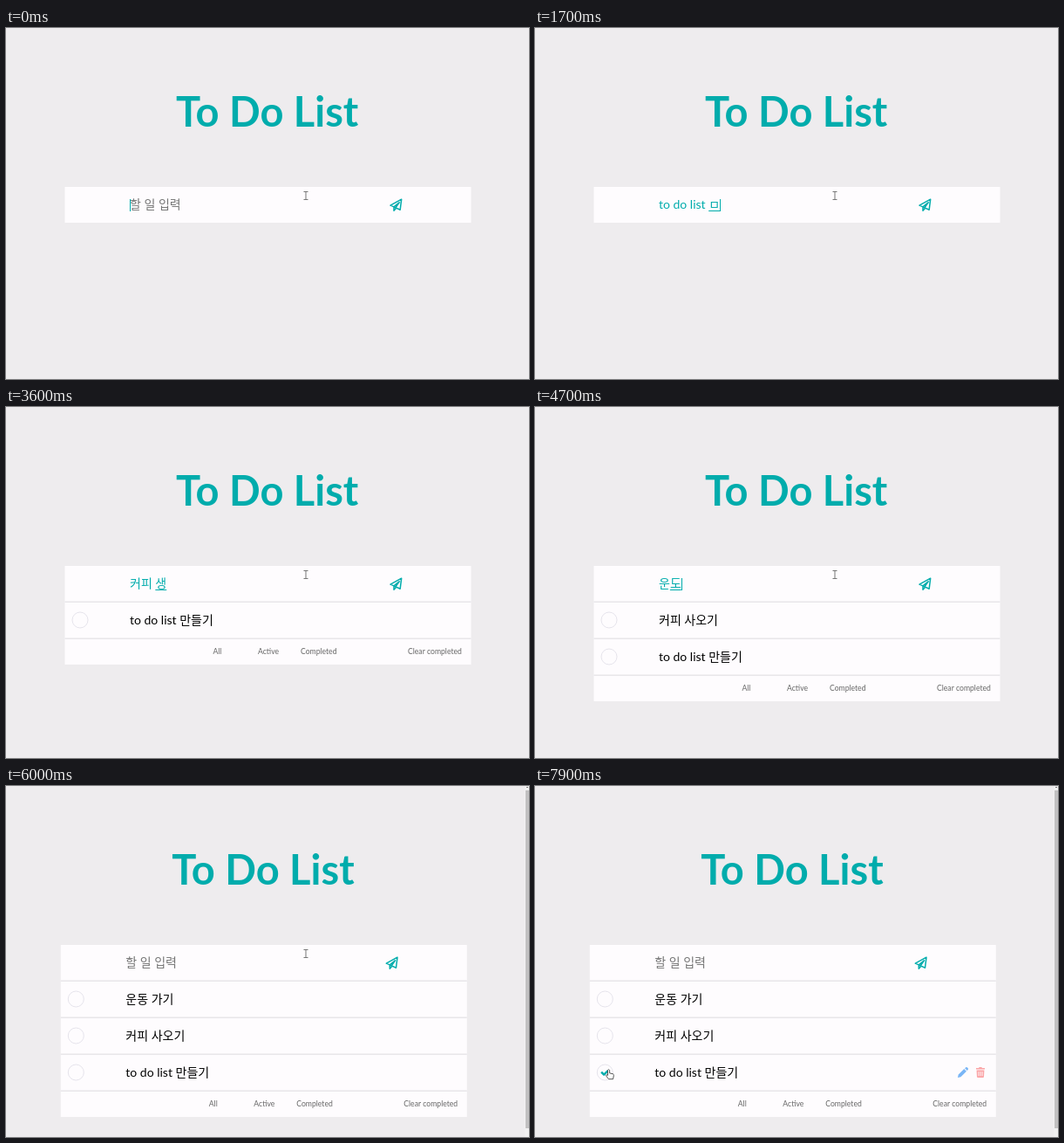
Animation, 600 px wide and 402 px high, one loop 8 s. Source, as an HTML page with a canvas:

```html
<!DOCTYPE html>
<html lang="ko">
<head>
<meta charset="utf-8">
<title>To Do List</title>
<style>
  html, body { margin: 0; width: 100%; height: 100%; overflow: hidden; background: #eeecee; }
  canvas { display: block; }
</style>
</head>
<body>
<canvas id="stage" width="600" height="402"></canvas>
<script>
const ctx = document.getElementById('stage').getContext('2d');
const LOOP = 8000, STEP = 100, ROW = 42;
const TEAL = '#00acac', PANEL = '#fefcfe';
const FONT = 'Lato, "Noto Sans CJK KR", "Noto Sans CJK", sans-serif';

// Input contents by time; an empty value shows the placeholder.
const typing = [
  [0, ''], [600, 't'], [700, 'to'], [800, 'to '], [900, 'to d'], [1000, 'to do'], [1100, 'to do '],
  [1300, 'to do l'], [1400, 'to do lis'], [1500, 'to do list '],
  [1700, 'to do list ㅁ'], [1800, 'to do list 만'], [1900, 'to do list 만ㄷ'],
  [2100, 'to do list 만드'], [2200, 'to do list 만들'], [2300, 'to do list 만듥'], [2400, 'to do list 만들기'],
  [2500, ''], [2700, 'ㅋ'], [2800, '커'], [2900, '컾'], [3100, '커피'], [3200, '커피 '],
  [3300, '커피 ㅅ'], [3400, '커피 새'], [3600, '커피 생', true], [3700, '커피 사'], [3800, '커피 사오'],
  [3900, '커피 사옥'], [4000, '커피 사오기'],
  [4100, ''], [4300, 'ㅇ'], [4400, '우'], [4500, '운'], [4600, '운ㄷ'], [4700, '운도'], [4800, '운동'],
  [5000, '운동 '], [5100, '운동 ㄱ'], [5200, '운동 가'], [5300, '운동 각'], [5400, '운동 가기'], [5500, '']
];
const added = [[5500, '운동 가기'], [4100, '커피 사오기'], [2500, 'to do list 만들기']];
const scrollbarAt = 5500, clickAt = 7000;

const pointerPath = [
  [0, 344, 192], [6000, 344, 192], [6800, 83.5, 327], [7000, 83.5, 327], [7200, 95, 330.5],
  [7300, 95, 330.5], [7400, 95, 325], [7500, 95, 325], [7900, 84.5, 324.5], [LOOP, 84.5, 324.5]
];

const shapes = {
  plane: new Path2D('M13.7 1.2L1 8.1 5 9.9 12.2 13.2ZM5 9.9L11.2 4.7 7 10.8M5 9.9V14.2L7.4 11.4'),
  pencil: new Path2D('M-6 6L-5.3 2.6 1.3-4 4-1.3-2.6 5.3ZM2.1-4.8L3.2-5.8Q4-6.4 4.8-5.7L5.8-4.7Q6.4-4 5.8-3.2L4.8-2.1Z'),
  trash: new Path2D('M-5-5H-2L-1.3-6H1.3L2-5H5V-3.4H-5ZM-4.4-2.6H4.4L4 5Q3.9 6 2.9 6H-2.9Q-3.9 6-4 5Z'),
  slots: new Path2D('M-2.1-.9V4.2M0-.9V4.2M2.1-.9V4.2'),
  check: new Path2D('M-4.2-.4L-1.2 2.6 3.6-2.2'),
  ibeam: new Path2D('M-2.5-4.5H2.5M0-4.5V4.5M-2.5 4.5H2.5'),
  hand: new Path2D('M-1 1Q0-.7 1.1 1V4.4L4.8 5.2Q6 5.6 5.8 7.2L5 11.2H0L-3.2 7Q-3 5.6-1 6.9Z'),
  arrow: new Path2D('M0 0V11L2.6 8.7 4.3 12.3 6 11.5 4.4 8H8Z')
};

function text(str, x, y, size, color, weight = 400) {
  ctx.font = `${weight} ${size}px ${FONT}`;
  ctx.fillStyle = color;
  ctx.fillText(str, x, y);
}

function rect(x, y, w, h, color) {
  ctx.fillStyle = color;
  ctx.fillRect(x, y, w, h);
}

function shape(name, x, y, fill, stroke, width = 1) {
  ctx.save();
  ctx.translate(x, y);
  ctx.lineWidth = width;
  ctx.lineJoin = 'round';
  if (fill) { ctx.fillStyle = fill; ctx.fill(shapes[name]); }
  if (stroke) { ctx.strokeStyle = stroke; ctx.stroke(shapes[name]); }
  ctx.restore();
}

function pointerAt(t) {
  const i = pointerPath.findIndex(p => p[0] > t);
  const [t0, x0, y0] = pointerPath[i - 1], [t1, x1, y1] = pointerPath[i];
  const u = (t - t0) / (t1 - t0), k = u * u * (3 - 2 * u);
  return { x: x0 + (x1 - x0) * k, y: y0 + (y1 - y0) * k };
}

function drawInput(t) {
  const [since, value, noCaret] = typing.filter(e => e[0] <= t).pop();
  text(value || '할 일 입력', 142, 207, 14, value ? TEAL : '#757575');
  const end = 142 + (value ? ctx.measureText(value).width : 0);
  if (value.slice(-1) > '\u3130') {
    const start = 142 + ctx.measureText(value.slice(0, -1)).width;
    rect(start, 209, end - start, 1, TEAL);
  }
  const blinkOn = (t - since) % 1000 < 500;
  if (blinkOn && !noCaret && t < clickAt) rect(Math.round(end), 196, 1, 14, TEAL);
  shape('plane', 440, 195, null, TEAL, 1.5);
}

function drawRow(label, y, hovered, checked) {
  ctx.beginPath();
  ctx.arc(85, y, 9, 0, Math.PI * 2);
  ctx.lineWidth = 1;
  ctx.strokeStyle = '#e6e4ec';
  ctx.stroke();
  if (checked) shape('check', 85, y, null, TEAL, 2.4);
  text(label, 142, y + 5, 14, '#000');
  if (hovered) {
    shape('pencil', 495.7, y, '#7ab6f6');
    shape('trash', 515.7, y, '#fba4a6');
    shape('slots', 515.7, y, null, PANEL, 0.9);
  }
}

function drawPointer({ x, y }) {
  if (y < 223) shape('ibeam', x, y, null, '#777');
  else shape(Math.hypot(x - 80.3, y - 328) < 9 ? 'hand' : 'arrow', x, y, '#fff', '#444', 0.9);
}

function draw(t) {
  const items = added.filter(e => e[0] <= t);
  const pointer = pointerAt(t);
  const footer = 223 + items.length * ROW;
  const scrolled = t >= scrollbarAt;

  rect(0, 0, 600, 402, '#eeecee');
  ctx.save();
  if (scrolled) ctx.translate(-4.7, 0);
  text('To Do List', 195, 113, 47, TEAL, 700);
  rect(67.5, 182, 466, footer - 182 + (items.length ? 30 : 0), PANEL);
  drawInput(t);
  items.forEach(([, label], i) => {
    const top = 223 + i * ROW;
    const hovered = pointer.y >= top && pointer.y < top + ROW;
    drawRow(label, top + 21, hovered, i === 2 && t >= clickAt);
  });
  if (items.length) {
    for (let y = 223; y <= footer; y += ROW) rect(67.5, y - 0.5, 466, 1.5, '#e8e6ea');
    [['All', 237.5], ['Active', 289], ['Completed', 338], ['Clear completed', 461]]
      .forEach(([label, x]) => text(label, x, footer + 18.3, 8.65, '#666'));
  }
  ctx.restore();

  if (scrolled) {
    rect(595, 0, 5, 402, '#f1f0f1');
    rect(596, 5, 4, 387, '#c1c0c1');
    rect(597, 1, 2, 1, '#777');
  }
  drawPointer(pointer);
}

function tick() {
  const t = performance.now() % LOOP;
  draw(Math.floor(t / STEP) * STEP);
  requestAnimationFrame(tick);
}
tick();
</script>
</body>
</html>
```
